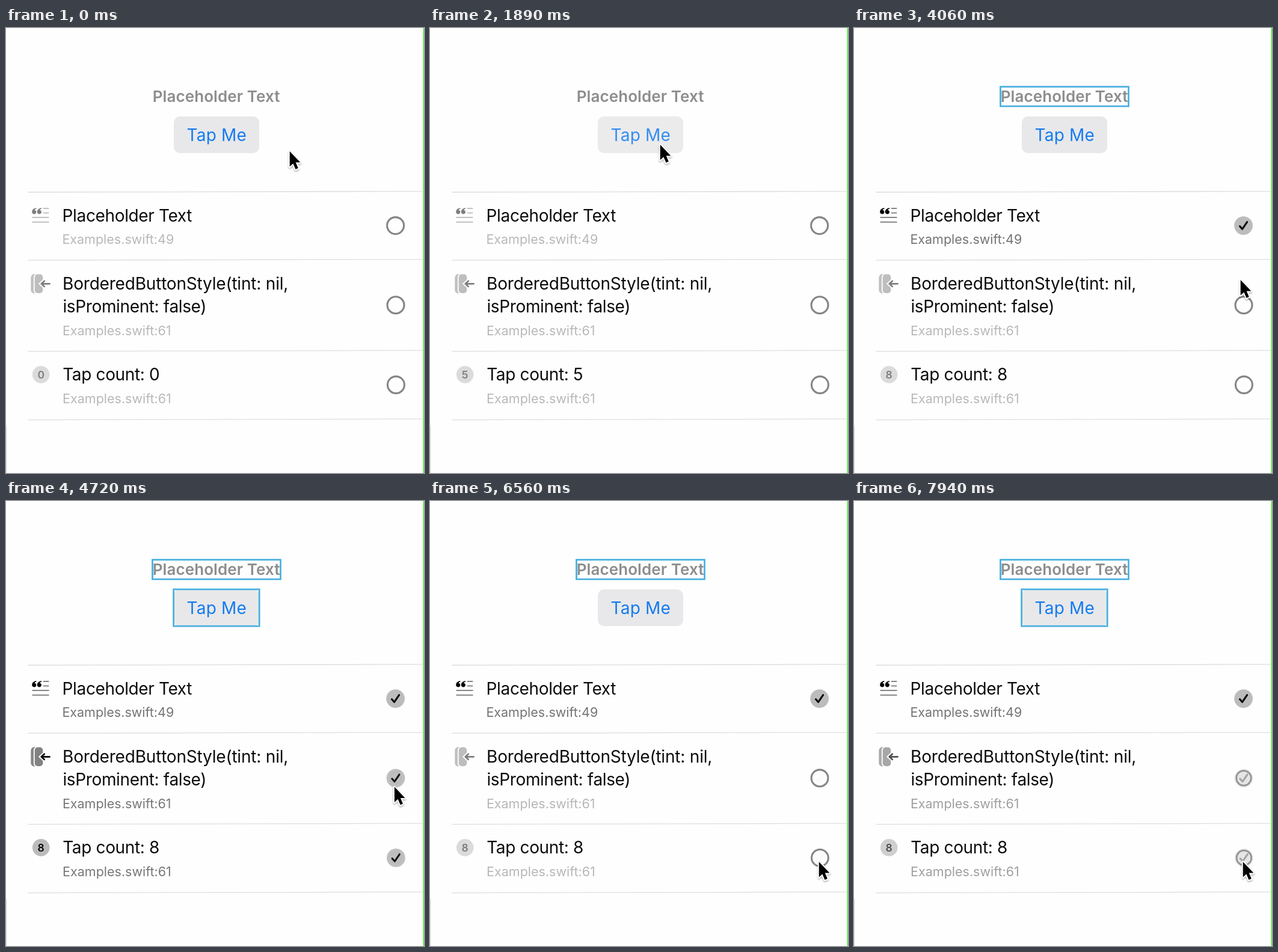
Animation, 695 px wide and 740 px high, one loop 8 s. Source, as an HTML page:

```html
<!DOCTYPE html>
<html lang="en">
<head>
<meta charset="utf-8">
<title>Tap count</title>
<style>
  html, body { margin: 0; width: 100%; height: 100%; overflow: hidden; background: #fefefe; }
  svg { display: block; width: 695px; height: 740px; }
  text { font-family: Inter, Roboto, sans-serif; font-optical-sizing: none; white-space: pre; }
  .title { font-size: 28px; letter-spacing: -.36px; fill: #0c0c0c; }
  .title.long { letter-spacing: -.2px; }
  .file { font-size: 21.5px; fill: #747474; }
  .header { font-size: 26px; font-weight: 600; letter-spacing: .08px; fill: #8d8d8d; text-anchor: middle; }
  .action { font-size: 28px; letter-spacing: .2px; fill: #147bf0; text-anchor: middle; }
  .badge { font-size: 17.5px; font-weight: 600; text-anchor: middle; }
  .rule { stroke: #dedede; stroke-width: 1.3; }
  .outline { fill: none; stroke: #48afdf; stroke-width: 2.7; }
  .ring { fill: none; stroke: #858585; stroke-width: 3.1; }
  .tick { fill: none; stroke: #080808; stroke-width: 3; stroke-linecap: round; stroke-linejoin: round; }
</style>
</head>
<body>
<svg viewBox="0 0 695 740">
  <defs>
    <path id="quote" d="M50.3 299.2C45.6 299.7 43.2 302.4 43.2 305.8C43.2 308 44.7 309.4 46.8 309.4C48.9 309.4 50.4 308 50.4 306C50.4 304.1 49.1 302.8 47.3 302.7C47.8 301.6 48.9 301 50.5 300.7Z"/>
    <path id="arrow" d="M.7 0V25.6L6.4 20.4L10.5 30L14.8 28.1L10.7 18.6H18.4Z"/>
    <filter id="shadow" x="-50%" y="-30%" width="220%" height="180%">
      <feDropShadow dx="0" dy="2" stdDeviation="1.6" flood-opacity=".32"/>
    </filter>
  </defs>
  <rect width="695" height="740" fill="#fefefe"/>
  <path d="M.4 662V740" stroke="#cfcfcf"/>
  <path d="M694.3 0V740" stroke="#45f52f" stroke-width="1.5"/>

  <text class="header" x="349.6" y="123.4">Placeholder Text</text>
  <g id="button">
    <rect x="279" y="147" width="142" height="61" rx="10" fill="#e8e8ea"/>
    <text class="action" x="350.3" y="188">Tap Me</text>
  </g>
  <rect class="outline" id="textOutline" x="243.5" y="97.7" width="213" height="32.4"/>
  <rect class="outline" id="buttonOutline" x="278.6" y="146.9" width="142.6" height="61.2"/>
  <g id="rules"></g>

  <text class="title" x="93.6" y="321.6">Placeholder Text</text>
  <text class="title long" x="94.1" y="435.2">BorderedButtonStyle(tint: nil,</text>
  <text class="title" x="94.4" y="472.8">isProminent: false)</text>
  <text class="title" id="count" x="94.2" y="586.4"></text>

  <g class="detail">
    <use href="#quote"/><use href="#quote" x="8.6"/>
    <path d="M62 300H71.3M62 307.5H71.3M43.5 315H71.5M43.5 322.7H71.5" stroke="#858585" stroke-width="1.9"/>
    <text class="file" x="93.4" y="359.4">Examples.swift:49</text>
  </g>
  <g class="detail">
    <rect x="41.3" y="409" width="15" height="32.6" rx="6" fill="#858585"/>
    <rect x="46.8" y="408.6" width="15.4" height="33.4" rx="6" fill="#808080" stroke="#fff" stroke-width="1.8"/>
    <path d="M73 425.3H58.5M64 420L58.3 425.3L64 430.6" fill="none" stroke="#fefefe" stroke-width="6"/>
    <path d="M72.6 425.3H59M63.8 420.7L58.7 425.3L63.8 429.9" fill="none" stroke="#000" stroke-width="2.7" stroke-linecap="round" stroke-linejoin="round"/>
    <text class="file" x="93.9" y="510.6">Examples.swift:61</text>
  </g>
  <g class="detail">
    <circle cx="58.2" cy="576.4" r="14.3" fill="#bababa"/>
    <text class="badge" id="badge" x="58.2" y="582.7"></text>
    <text class="file" x="94.1" y="624.4">Examples.swift:61</text>
  </g>
  <g id="checks"></g>

  <g id="cursor" filter="url(#shadow)">
    <use href="#arrow" fill="#fff" stroke="#fff" stroke-width="3.6" stroke-linejoin="round"/>
    <use href="#arrow"/>
  </g>
</svg>
<script>
const LOOP = 8000, FADE = 370;
const $ = id => document.getElementById(id);

// [time, x, y] of the pointer's tip
const path = [
  [0, 471, 205], [80, 471, 205], [600, 382, 194], [2600, 382, 194],
  [2780, 566, 366], [2890, 602, 348], [3150, 632, 338], [3850, 632, 338],
  [4060, 642, 419], [4230, 645, 450], [4640, 645, 450], [4950, 646, 600],
  [5120, 646, 600], [5280, 632, 632], [5600, 628, 640], [5900, 628, 640],
  [6150, 646, 600], [LOOP, 646, 600]
];
const taps = Array.from({ length: 8 }, (_, i) => 820 + 245 * i);
const textToggles = [3520];
const buttonToggles = [4400, 6220, 7790];

const clamp = v => Math.min(1, Math.max(0, v));
const ease = v => v * v * (3 - 2 * v);

function pointAt(t) {
  const i = path.findIndex(p => p[0] > t);
  const [t0, x0, y0] = path[i - 1], [t1, x1, y1] = path[i];
  const k = ease((t - t0) / (t1 - t0));
  return [x0 + (x1 - x0) * k, y0 + (y1 - y0) * k];
}

function selection(toggles, t) {
  const past = toggles.filter(s => s <= t);
  const on = past.length % 2 === 1;
  const k = past.length ? ease(clamp((t - past.at(-1)) / FADE)) : 1;
  return { on, amount: on ? k : 1 - k };
}

// Quick dip on press, slower recovery after release.
function pressAt(t) {
  return Math.max(...taps.map(s =>
    t < s ? clamp((t - s + 110) / 50) : clamp(1 - (t - s) / 170)));
}

$('rules').innerHTML = [273, 386.2, 537.6, 651.6].map(y =>
  `<path class="rule" d="M36 ${y}L693 ${y - 1.4}"/>`).join('');

$('checks').innerHTML = [[647.6, 328.6], [648, 460.8], [648.4, 593.4]].map(([x, y]) =>
  `<g transform="translate(${x} ${y})">
    <g class="disc"><circle r="15.4" fill="#bcbcbc"/><path class="tick" d="M-6.2 1L-2 5.8L6 -6"/></g>
    <circle class="ring" r="14"/>
  </g>`).join('');

const details = document.querySelectorAll('.detail');
const rings = document.querySelectorAll('.ring');
const discs = document.querySelectorAll('.disc');

function draw(t) {
  const text = selection(textToggles, t), button = selection(buttonToggles, t);
  [text, button, button].forEach(({ amount }, i) => {
    details[i].style.opacity = .5 + amount / 2;
    // The ring shrinks into the disc and fades late.
    rings[i].style.opacity = 1 - amount ** 2;
    rings[i].setAttribute('transform', `scale(${1 - .35 * amount})`);
    discs[i].style.opacity = amount;
  });
  $('textOutline').style.opacity = +text.on;
  $('buttonOutline').style.opacity = +button.on;
  $('button').style.opacity = 1 - .3 * pressAt(t);

  const count = taps.filter(s => s <= t).length;
  $('count').textContent = `Tap count: ${count}`;
  $('badge').textContent = count;
  $('cursor').setAttribute('transform', `translate(${pointAt(t)})`);
}

const start = performance.now();
function tick() {
  draw((performance.now() - start) % LOOP);
  requestAnimationFrame(tick);
}
tick();
</script>
</body>
</html>
```
